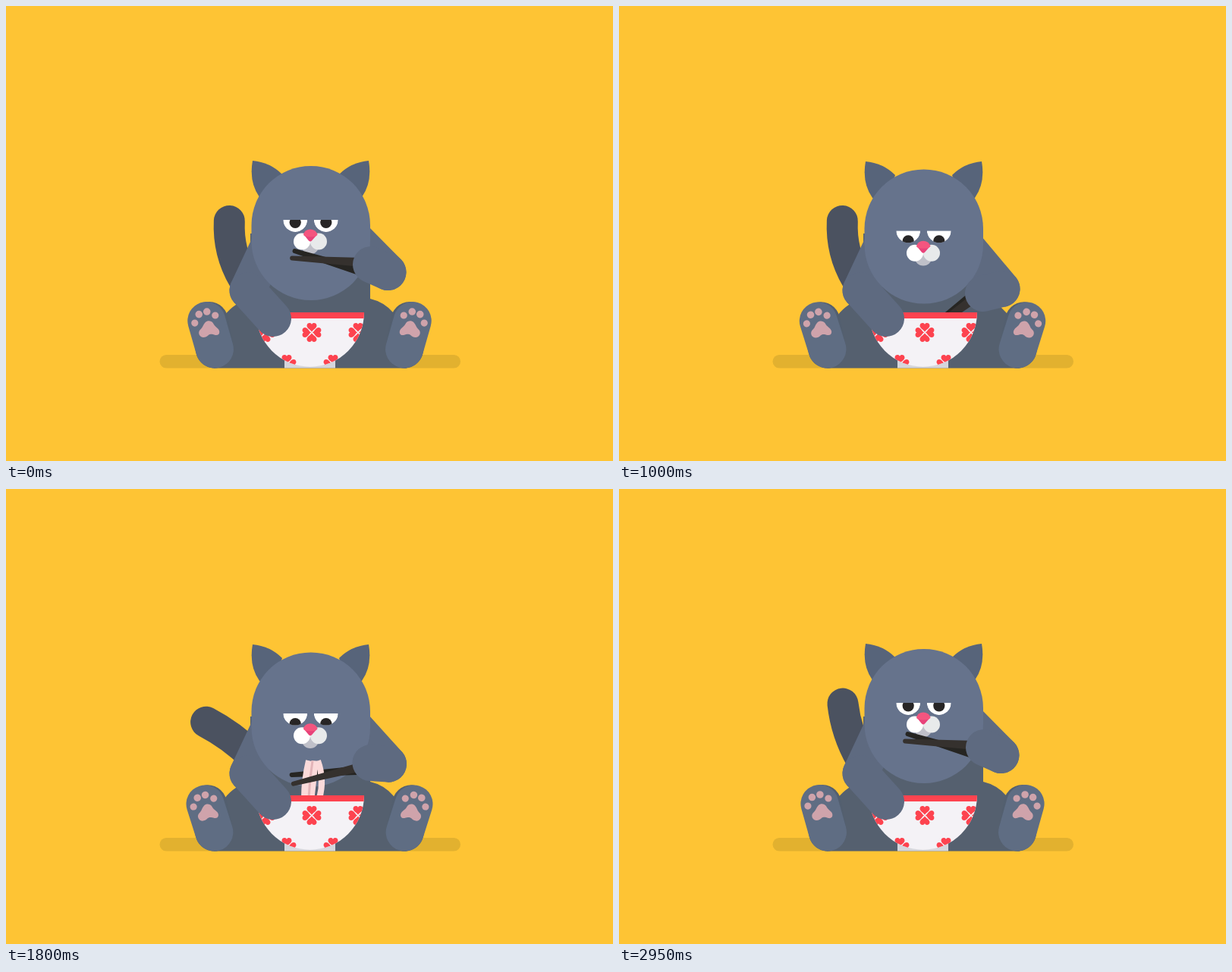
Write an HTML page that moves like this. It is 800 px wide and 600 px high and loops after 3000 ms.

```html
<!DOCTYPE html>
<html lang="en">
<head>
<meta charset="utf-8">
<title>Cat with noodles</title>
<style>
  html, body { margin: 0; width: 100%; height: 100%; overflow: hidden; background: #fec434; }
  svg { display: block; width: 800px; height: 600px; }
  .limb { fill: none; stroke: #5e6a80; stroke-width: 48; stroke-linecap: round; stroke-linejoin: round; }
  .sole { fill: none; stroke-width: 50; stroke-linecap: round; }
  .noodle { fill: none; stroke: #fbdada; }
  .pad { fill: #cfa3ab; }
</style>
</head>
<body>
<svg viewBox="0 0 800 600">
  <defs>
    <clipPath id="lid"><path d="M-16 0A16 16 0 0 0 16 0z"/></clipPath>
    <clipPath id="bowlShape"><path d="M329.5 404H472A71 71.5 0 0 1 329.5 404z"/></clipPath>
    <path id="petal" d="M0-1C-2-4-6.5-5.5-6.5-9C-6.5-13-1-13.5 0-10.5C1-13.5 6.5-13 6.5-9C6.5-5.5 2-4 0-1z"/>
    <g id="flower" fill="#fd434f">
      <use href="#petal"/>
      <use href="#petal" transform="rotate(90)"/>
      <use href="#petal" transform="rotate(180)"/>
      <use href="#petal" transform="rotate(270)"/>
    </g>
    <path id="ear" d="M325 204Q348 206 364 222L350 262L334 252Q320 232 325 204z"/>
    <g id="foot">
      <path class="sole" stroke="#535f6f" d="M268 415L275 452.5"/>
      <path class="sole" stroke="#5f6d83" d="M264.5 415L275 452.5"/>
      <g class="pad">
        <circle cx="249" cy="418" r="4.6"/>
        <circle cx="254.5" cy="406.5" r="4.8"/>
        <circle cx="265" cy="403" r="4.8"/>
        <circle cx="276" cy="408" r="4.6"/>
        <path d="M263 417C266 414 271 415 273 418C275 422 277 423 280 426C283 430 281 435 276 434C272 433 270 432 267 434C264 437 260 438 257 436C253 433 254 428 257 426C260 423 260 420 263 417z"/>
      </g>
    </g>
    <g id="eyeball" clip-path="url(#lid)">
      <path fill="#fff" d="M-16 0A16 16 0 0 0 16 0z"/>
      <circle id="pupil" r="7.6" fill="#272525"/>
    </g>
  </defs>

  <rect width="800" height="600" fill="#fec434"/>
  <rect x="202.5" y="460" width="396.5" height="17.5" rx="8.75" fill="#e2b12f"/>
  <path id="tail" fill="none" stroke="#4b5260" stroke-width="41" stroke-linecap="round"/>
  <path fill="#55606f" d="M322 300H480V386Q501 391 513 408L528 477.5H274L288 408Q301 391 322 386z"/>
  <g id="leftFoot"><use href="#foot"/></g>
  <g transform="matrix(-1 0 0 1 800 0)"><g id="rightFoot"><use href="#foot"/></g></g>

  <path class="limb" d="M349 310L318.5 375"/>
  <path class="limb" id="upperArm"/>
  <g id="ears" fill="#57647a">
    <use href="#ear"/>
    <use href="#ear" transform="matrix(-1 0 0 1 803 0)"/>
  </g>
  <rect id="head" x="323.5" y="211" width="156.5" height="177" rx="78" fill="#66738c"/>
  <g id="eyes">
    <use href="#eyeball" x="381.2"/>
    <use href="#eyeball" x="421.8"/>
  </g>
  <g id="muzzle">
    <circle cx="401" cy="316" r="11.3" fill="#bfc0c9"/>
    <circle cx="412" cy="310.5" r="11" fill="#e8eaeb"/>
    <circle cx="390" cy="310.5" r="11" fill="#fff"/>
    <path fill="#e8427a" d="M392 301H410.5L403 309.5Q401 311.500 399 309.500z"/>
    <path fill="#f4557f" d="M392 301Q394 294.500 401 294.500T410.500 301Q410 304.500 401 304.500T392 301z"/>
  </g>

  <path id="stickA" fill="#262522"/>
  <g id="noodles"></g>
  <path id="stickB" fill="#35312e"/>
  <path class="limb" id="foreArm"/>

  <rect x="367" y="464" width="67" height="13.5" fill="#d5d6dc"/>
  <g clip-path="url(#bowlShape)">
    <rect x="329" y="404" width="144" height="74" fill="#f4f2f6"/>
    <rect x="329" y="404" width="144" height="8" fill="#fd434f"/>
    <use href="#flower" x="342" y="430.500"/>
    <use href="#flower" x="403" y="430.500"/>
    <use href="#flower" x="464" y="430.500"/>
    <use href="#flower" x="370" y="472.500"/>
    <use href="#flower" x="431" y="472.500"/>
  </g>
  <path class="limb" d="M318.500 375L352 412"/>
</svg>
<script>
const $ = id => document.getElementById(id);
const set = (id, name, value) => $(id).setAttribute(name, value);
const shift = (id, y) => set(id, 'transform', `translate(0 ${y})`);
const wave = (t, peak, period) => Math.cos((t - peak) / period * 2 * Math.PI);
const mix = (a, b, k) => a + (b - a) * k;

// Eased value at time t from [time, value] keys
function key(t, keys) {
  if (t <= keys[0][0]) return keys[0][1];
  for (let i = 1; i < keys.length; i++) {
    const [t0, a] = keys[i - 1], [t1, b] = keys[i];
    if (t < t1) {
      const u = (t - t0) / (t1 - t0);
      return mix(a, b, u * u * (3 - 2 * u));
    }
  }
  return keys[keys.length - 1][1];
}

// top x, middle x, bottom x when lifted and when eaten, then width
const strands = [
  { open: [411, 420, 413], shut: [407, 405, 401], w: 8 },
  { open: [400, 394, 394], shut: [399, 393, 391], w: 10 },
  { open: [407, 405, 402], shut: [407, 403, 401], w: 9 },
  { open: [404, 400, 399], shut: [403, 398, 396], w: 3, color: '#e3b5b9' }
];
for (const s of strands) {
  s.el = document.createElementNS('http://www.w3.org/2000/svg', 'path');
  s.el.setAttribute('class', 'noodle');
  s.el.style.strokeWidth = s.w;
  if (s.color) s.el.style.stroke = s.color;
  $('noodles').append(s.el);
}

function tail(t) {
  const reach = 150, base = [370, 413];
  const angle = (26.6 + 35.6 * wave(t, 970, 1000) - 2 * wave(t, 970, 500)) * Math.PI / 180;
  const bend = 2 + 30 * wave(t, 600, 1000) || 0.01;
  const r = (reach * reach / 4 + bend * bend) / (2 * Math.abs(bend));
  const x = base[0] - reach * Math.cos(angle), y = base[1] - reach * Math.sin(angle);
  set('tail', 'd', `M${x} ${y}A${r} ${r} 0 0 ${bend > 0 ? 1 : 0} ${base}`);
}

// Tapered stick with a rounded tip on the left
function stick(id, x, y, angle) {
  set(id, 'd', 'M10-6L-82-3A3 3 0 0 0-82 3L10 6z');
  set(id, 'transform', `translate(${x} ${y}) rotate(${angle})`);
}

function noodles(t) {
  const top = key(t, [[1400, 410], [2050, 333], [2500, 334]]);
  const end = key(t, [[2550, 408], [2850, 330]]);
  const k = key(t, [[2050, 0], [2450, 1]]);
  const show = t > 1400 && end > top;
  for (const s of strands) {
    const [a, b, c] = s.open.map((v, i) => mix(v, s.shut[i], k));
    s.el.setAttribute('d', show ? `M${a} ${top}Q${b} ${(top + end) / 2} ${c} ${end}` : '');
  }
}

function draw(t) {
  tail(t);

  const tilt = -3.5 * (1 - wave(t, 1380, 1500)) / 2;
  for (const id of ['leftFoot', 'rightFoot']) set(id, 'transform', `rotate(${tilt} 276 470)`);

  const nod = key(t, [[100, 0], [750, 1], [1750, 1], [2250, 0]]);
  shift('head', 4.6 * nod);
  shift('ears', nod);
  shift('eyes', 282 + 14.2 * nod);
  shift('muzzle', 15.2 * nod);
  set('pupil', 'cy', key(t, [[0, 3.5], [400, 3.5], [820, 13.7], [2550, 13.7], [3000, 3.5]]));

  const dip = key(t, [[100, 0], [720, 1], [1430, 1], [2200, 0]]);
  const hx = 481 - dip, hy = 341 + 38 * dip;
  const elbow = `${503.5 + dip} ${351 + 22 * dip}`;
  set('upperArm', 'd', `M455 ${302 + 12 * dip}L${elbow}`);
  set('foreArm', 'd', `M${hx} ${hy}L${elbow}`);

  const pose = (up, down, deep, scoop, lift, bite) => key(t, [
    [100, up], [680, down], [1000, deep], [1500, scoop], [2050, lift], [2350, bite], [2550, bite], [2950, up]
  ]);
  stick('stickA', hx - 22, hy + pose(6, 9, 9, 12, 9, 6), pose(17, -33, -38, -26, 13, 18.5));
  stick('stickB', hx - 22, hy + pose(-3.5, 14, 14, 15, 2, -3.5), pose(3.5, -33, -36, -28, -3.5, 2.5));
  noodles(t);
}

const start = performance.now();
function frame(now) {
  const t = Math.max(0, now - start) % 3000;
  draw(Math.floor(t / 50) * 50);
  requestAnimationFrame(frame);
}
draw(0);
requestAnimationFrame(frame);
</script>
</body>
</html>
```
